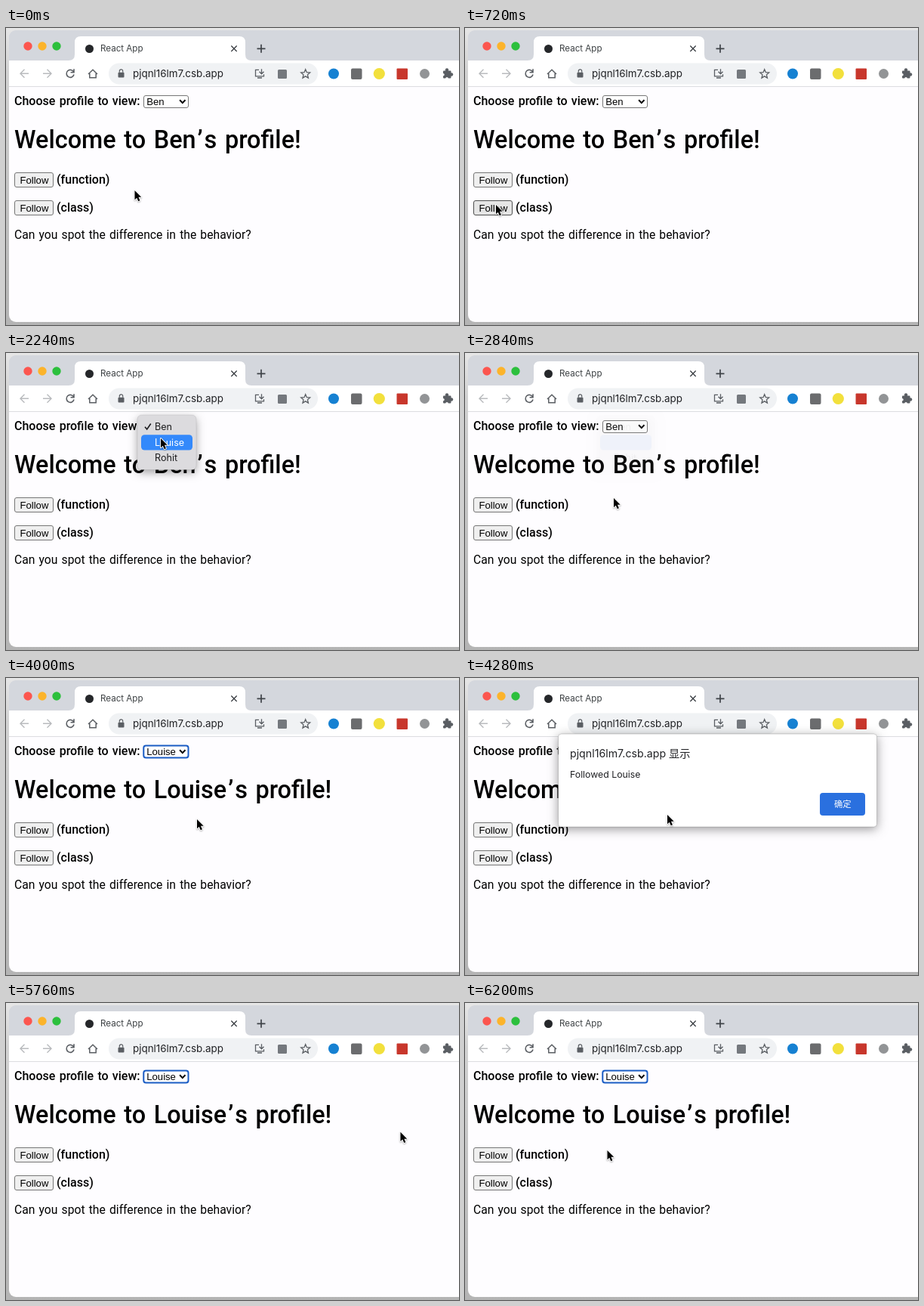
Animation, 600 px wide and 393 px high, one loop 6.28 s. Source, as an HTML page with a canvas:

```html
<!DOCTYPE html>
<html lang="en">
<head>
<meta charset="utf-8">
<title>Profile demo</title>
<style>
html, body { margin: 0; width: 100%; height: 100%; overflow: hidden; }
canvas { display: block; width: 600px; height: 393px; }
</style>
</head>
<body>
<canvas id="stage"></canvas>
<script>
const W = 600, H = 393, LOOP = 6280, STEP = 40;
const UI = 'Inter, "Noto Sans CJK SC", "Noto Sans CJK", sans-serif';
const PAGE = 'Roboto, sans-serif';
const FORM = '"Liberation Sans", Arial, sans-serif';
const NAMES = ['Ben', 'Louise', 'Rohit'];
const SITE = 'pjqnl16lm7.csb.app';
const ICON = '#5a5e63';

const canvas = document.getElementById('stage');
const c = canvas.getContext('2d');
const dpr = window.devicePixelRatio || 1;
canvas.width = W * dpr;
canvas.height = H * dpr;

// Pointer track: time, x, y
const TRACK = [
  [40, 170.5, 215], [600, 46, 233], [720, 41, 234], [1000, 41, 234], [1200, 41, 234],
  [1480, 184, 111], [1780, 213, 97], [1960, 213, 97], [2200, 205, 113], [2520, 205, 113],
  [2800, 197, 192], [3200, 197, 192], [3800, 253, 187], [4040, 253, 187],
  [4280, 268, 181], [4640, 268, 181], [5200, 527.5, 169], [5880, 522, 171], [6180, 188.5, 195]
];

const clamp = v => Math.max(0, Math.min(1, v));
const ramp = (t, a, b) => clamp((t - a) / (b - a));
const ease = p => p * p * (3 - 2 * p);

function pointerAt(t) {
  let a = TRACK[0];
  for (const b of TRACK) {
    if (t < b[0]) {
      const p = ease(ramp(t, a[0], b[0]));
      return [a[1] + (b[1] - a[1]) * p, a[2] + (b[2] - a[2]) * p];
    }
    a = b;
  }
  return [a[1], a[2]];
}

function text(str, x, y, font, color) {
  c.font = font;
  c.fillStyle = color || '#000';
  c.fillText(str, x, y);
  return x + c.measureText(str).width;
}

// Page copy is set with slightly open word spaces
function copy(str, x, y, size, weight) {
  c.wordSpacing = size * 0.08 + 'px';
  const end = text(str, x, y, weight + ' ' + size + 'px ' + PAGE);
  c.wordSpacing = '0px';
  return end;
}

function box(x, y, w, h, r, fill, stroke, lw) {
  c.beginPath();
  c.roundRect(x, y, w, h, r);
  if (fill) { c.fillStyle = fill; c.fill(); }
  if (stroke) { c.strokeStyle = stroke; c.lineWidth = lw || 1; c.stroke(); }
}

function dot(x, y, r, fill) {
  c.beginPath();
  c.arc(x, y, r, 0, 7);
  c.fillStyle = fill;
  c.fill();
}

function path(d, color, lw, x = 0, y = 0) {
  c.save();
  c.translate(x, y);
  c.strokeStyle = color;
  c.lineWidth = lw;
  c.stroke(new Path2D(d));
  c.restore();
}

function shadow(color, blur, dy) {
  c.shadowColor = color;
  c.shadowBlur = blur * dpr;
  c.shadowOffsetY = dy * dpr;
}

function tabBar() {
  dot(29, 24, 5.7, '#fc564f');
  dot(48, 24, 5.7, '#fcb42b');
  dot(67, 24, 5.7, '#2cc03d');
  c.fillStyle = '#fff';
  c.fill(new Path2D('M83 43Q91 43 91 35V19Q91 11 99 11H309Q317 11 317 19V35Q317 43 325 43Z'));
  dot(110.5, 27.5, 5.5, '#25272a');
  text('React App', 125, 31.3, '11.6px ' + UI, '#3c4043');
  path('M-3.7-3.7L3.7 3.7M-3.7 3.7L3.7-3.7', '#3f4348', 1.4, 302, 27.3);
  path('M-5.5 0H5.5M0-5.5V5.5', '#3f4348', 1.7, 338, 27.3);
}

function star(x, y, r) {
  c.beginPath();
  for (let i = 0; i < 10; i++) {
    const a = -Math.PI / 2 + i * Math.PI / 5, k = i % 2 ? r * 0.45 : r;
    c.lineTo(x + k * Math.cos(a), y + k * Math.sin(a));
  }
  c.closePath();
  c.strokeStyle = ICON;
  c.lineWidth = 1.3;
  c.stroke();
}

function toolbar() {
  c.fillStyle = '#fff';
  c.fillRect(4, 43, 596, 34);
  c.fillStyle = '#dcdde0';
  c.fillRect(4, 77, 596, 1);
  path('M5.5 0H-5M0-5.5L-5.5 0L0 5.5', '#b9bbbe', 1.4, 24.5, 60.3);
  path('M-5.5 0H5M0-5.5L5.5 0L0 5.5', '#b9bbbe', 1.4, 54.5, 60.3);
  path('M4.6-2.2A5 5 0 1 0 5 1.2M5-6V-1.6H.6', ICON, 1.6, 85, 60.3);
  path('M-6 .5L0-5.2L6 .5M-4.2-.6V5.2H4.2V-.6', ICON, 1.5, 115, 60.5);
  box(136, 46.5, 277, 28, 14, '#f0f2f4');
  box(148.5, 58.8, 8, 6.7, 1, ICON);
  path('M-2.2 0V-1.8A2.2 2.2 0 0 1 2.2-1.8V0', ICON, 1.2, 152.5, 58.8);
  text(SITE, 168, 65, '13.4px ' + UI, '#202124');
  path('M-1-5H-5.5V3.5H5.5V1M-3 5.7H3M2.5-6V0M-.5-2.5L2.5 .5L5.5-2.5', ICON, 1.3, 336, 60.3);
  box(360, 55, 12, 12, 1.5, '#74787d');
  star(396.7, 61, 6.3);
  dot(434, 60.5, 7, '#1681d2');
  box(457, 53.5, 14.5, 14.5, 2, '#6b6c6e');
  dot(494.3, 60.5, 7.6, '#f2e03c');
  box(517.5, 53.5, 14.5, 14.5, 1, '#c8372c');
  dot(554.5, 60.5, 6.5, '#929496');
  box(579, 56.5, 10.5, 10, 1, ICON);
  dot(584, 55.5, 2.2, ICON);
  dot(590, 61.5, 2.2, ICON);
  dot(579, 61.8, 1.7, '#fff');
  dot(584, 66.6, 1.7, '#fff');
}

function button(y, hover, down) {
  const fill = down ? '#f5f5f5' : hover ? '#e5e5e5' : '#efefef';
  box(11.5, y + 0.5, 51, 19, 2.5, fill, hover && !down ? '#4f4f4f' : '#767676');
  text('Follow', 18.5, y + 14.6, '13.1px ' + FORM);
}

function select(name, focus) {
  if (focus) box(182.3, 89.5, 59.2, 16, 3, '#fff', '#1a5cc4', 2);
  else box(182.5, 89.5, 59, 16, 2.5, '#fff', '#767676');
  text(name, 186.3, 102, '13.1px ' + FORM);
  path('M-3.7-2L0 1.8L3.7-2', '#000', 2, 233.8, 97.3);
}

function page(t, tip) {
  const late = t >= 2920, name = NAMES[late ? 1 : 0];
  const over = y => tip[0] > 11 && tip[0] < 63 && tip[1] > y && tip[1] < y + 20;
  copy('Choose profile to view:', 11, 102, 16, 500);
  select(name, late);
  let x = copy('Welcome to ' + name, 11, 158.5, 32.4, 500);
  x = copy('\u2019', x + 2, 158.5, 32.4, 500);
  copy('s profile!', x + 2, 158.5, 32.4, 500);
  button(191, over(191), false);
  copy('(function)', 67, 206, 16, 500);
  button(228, over(228), t >= 840 && t < 960);
  copy('(class)', 67, 242.5, 16, 500);
  copy('Can you spot the difference in the behavior?', 11, 279.2, 15.7, 400);
}

function menu(alpha, pick) {
  if (alpha <= 0) return;
  c.save();
  c.globalAlpha = alpha;
  c.save();
  shadow('rgba(0,0,0,.35)', 12, 4);
  box(174, 82, 78, 72.5, 5.5, '#dcdbde');
  c.restore();
  box(174, 82, 78, 72.5, 5.5, null, 'rgba(0,0,0,.12)', 0.6);
  if (pick >= 0) box(179, 87.5 + pick * 20.7, 68, 20.3, 4.5, '#3389fb');
  NAMES.forEach((n, i) =>
    text(n, 197, 102 + i * 20.7, '12.6px ' + UI, i === pick ? '#fff' : '#1c1c1e'));
  path('M-4 .3L-1.3 3.5L3.8-4', pick === 0 ? '#fff' : '#1c1c1e', 1.6, 188, 97.5);
  c.restore();
}

function dialog(alpha) {
  if (alpha <= 0) return;
  c.save();
  c.globalAlpha = alpha;
  c.save();
  shadow('rgba(0,0,0,.4)', 14, 3);
  box(123.5, 74, 422, 123, 4, '#fff');
  c.restore();
  box(123.5, 74, 422, 123, 4, null, 'rgba(0,0,0,.25)', 0.7);
  text(SITE + ' 显示', 139, 104.7, '14.2px ' + UI, '#202124');
  text('Followed ' + NAMES[1], 139, 132, '12.3px ' + UI, '#202124');
  box(470, 152, 60, 30, 4, '#2a70df');
  text('确定', 489, 171.3, '500 11.3px ' + UI, '#fff');
  c.restore();
}

function pointer(x, y) {
  c.save();
  c.translate(x, y);
  c.scale(0.9, 0.9);
  const p = new Path2D('M0 0V13.6L3.1 10.7L5.3 15.8L7.7 14.8L5.5 9.8H9.7Z');
  shadow('rgba(0,0,0,.3)', 2, 1);
  c.lineJoin = 'round';
  c.strokeStyle = '#fff';
  c.lineWidth = 2;
  c.stroke(p);
  c.shadowColor = 'transparent';
  c.fillStyle = '#000';
  c.fill(p);
  c.restore();
}

function backdrop() {
  const g = c.createLinearGradient(0, 0, 0, H);
  g.addColorStop(0, '#e6e6e6');
  g.addColorStop(0.15, '#d2d2d2');
  g.addColorStop(1, '#b4b4b4');
  c.fillStyle = g;
  c.fillRect(0, 0, W, H);
}

function draw(t) {
  const tip = pointerAt(t);
  c.setTransform(dpr, 0, 0, dpr, 0, 0);
  backdrop();
  c.save();
  c.beginPath();
  c.roundRect(4, 3, 620, 386, 9);
  c.clip();
  c.fillStyle = '#d4d7dd';
  c.fillRect(0, 0, W, 43);
  c.fillStyle = '#fefdff';
  c.fillRect(0, 43, W, H);
  tabBar();
  toolbar();
  page(t, tip);
  c.restore();
  const blink = t >= 2560 && t < 2620;
  const pick = blink ? -1 : t < 2080 ? 0 : 1;
  menu(t < 1880 ? 0 : 1 - ramp(t, 2640, 2850), pick);
  dialog(ramp(t, 4080, 4200) * (1 - ramp(t, 5600, 5760)));
  pointer(tip[0], tip[1]);
}

function tick(now) {
  const t = now % LOOP;
  draw(Math.min(6200, Math.floor(t / STEP) * STEP));
  requestAnimationFrame(tick);
}
draw(0);
requestAnimationFrame(tick);
</script>
</body>
</html>
```
